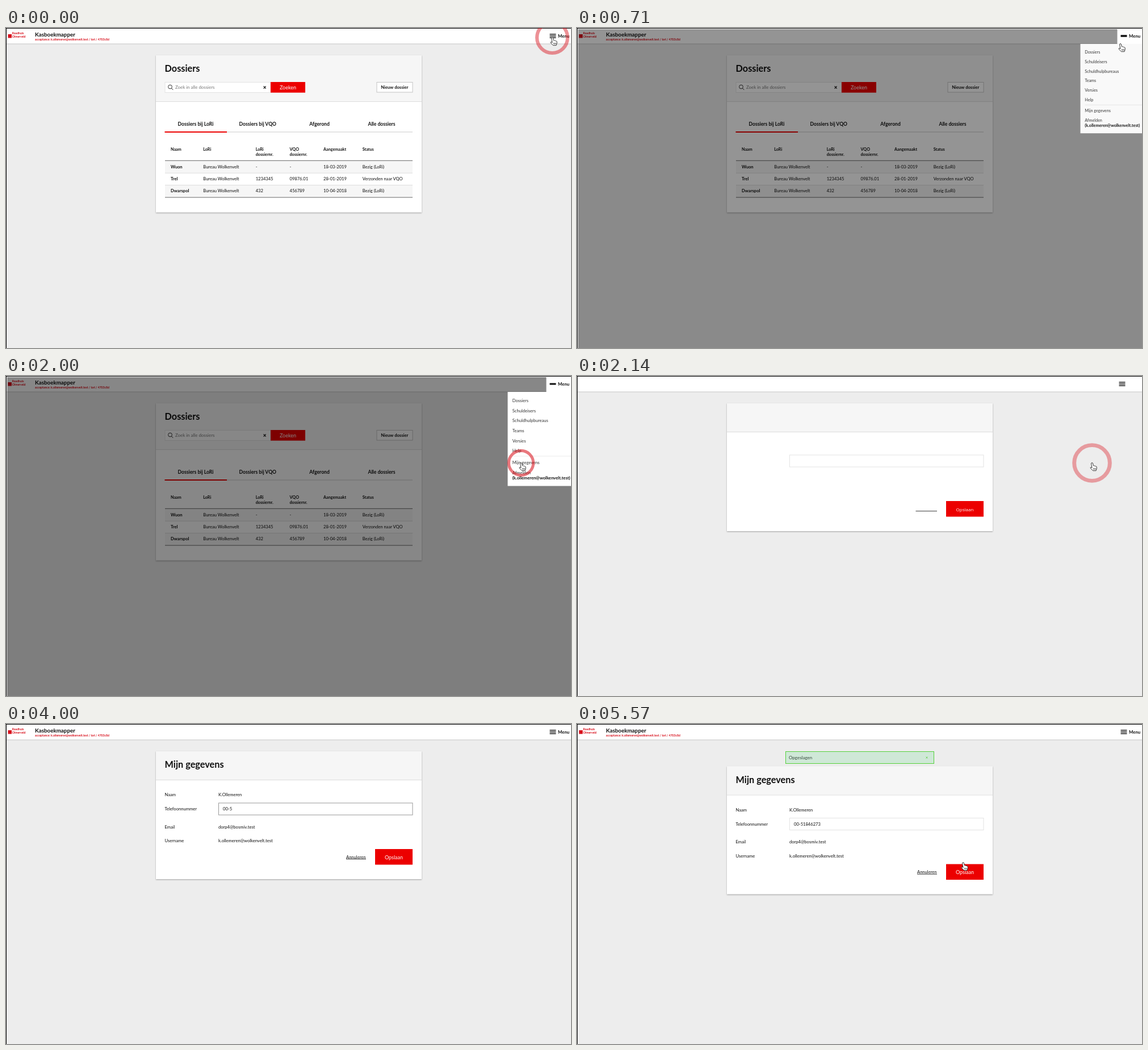
Recreate the animation shown at these times as an HTML page. Size 995 by 563 pixels, loop 6.14 s.

```html
<!DOCTYPE html>
<html lang="nl">
<head>
<meta charset="utf-8">
<title>Mijn gegevens</title>
<style>
  html, body { margin: 0; width: 100%; height: 100%; overflow: hidden; background: #ededed; }
  svg { display: block; width: 100vw; height: 100vh; }
  text { font: 7.6px Lato, "Open Sans", sans-serif; fill: #111; white-space: pre; }
  .b { font-weight: 700; }
  .m { text-anchor: middle; }
  .h1 { font-size: 16.3px; font-weight: 700; }
  .tab { font-size: 8.6px; font-weight: 700; text-anchor: middle; }
  .th { font-size: 7.2px; font-weight: 700; }
  .btn { font-size: 9px; fill: #fff; text-anchor: middle; }
  .brand { font-size: 5.1px; font-weight: 700; fill: #d8101c; }
  .red { fill: #ec0000; }
  .card { fill: #fff; filter: drop-shadow(0 1px 1px #0005); }
  .head { fill: #f6f6f6; }
  .box { fill: #fff; stroke: #e3e3e3; }
  .rule { stroke: #ddd; }
  .dark { stroke: #666; }
  .bare .txt { visibility: hidden; }
  .bare #save text { font: 8px "Open Sans", sans-serif; }
  .cursor { fill: #fff; stroke: #222; stroke-width: .9; stroke-linejoin: round; }
  #menu { transform-origin: 943.5px 28px; }
  #menu text { fill: #333; }
  #menu .b { fill: #111; }
</style>
</head>
<body>
<svg id="stage" viewBox="0 0 995 563" preserveAspectRatio="none">
  <rect width="995" height="563" fill="#ededed"/>
  <rect width="995" height="27.5" fill="#fff"/>
  <path d="M0 28H995" stroke="#c9c9c9"/>
  <g class="txt">
    <rect x="3.5" y="11" width="6.5" height="6.5" fill="#d8101c"/>
    <text class="brand" x="10.8" y="11.4">Raadhuis</text>
    <text class="brand" x="10.8" y="16.6">Olmerveld</text>
    <text class="b" x="51" y="15" style="font-size:9.8px">Kasboekmapper</text>
    <text class="brand" x="51" y="22.3">acceptance: k.ollemeren@wolkenvelt.test / lori / 4703c8d</text>
  </g>

  <g id="list">
    <rect class="card" x="264" y="48" width="468" height="276.5"/>
    <rect class="head" x="264" y="48" width="468" height="81.5"/>
    <path class="rule" d="M264 129.5H732"/>
    <text class="h1" x="279.5" y="77">Dossiers</text>
    <rect class="box" x="280" y="95.5" width="186" height="18"/>
    <g fill="none" stroke="#333"><circle cx="289" cy="103.5" r="3.4"/><path d="M291.5 106L294.3 109"/></g>
    <text x="298" y="106.6" style="font-size:7.9px;fill:#777">Zoek in alle dossiers</text>
    <path d="M453.6 102.4L457.6 106.6M457.6 102.4L453.6 106.6" stroke="#111" stroke-width="1.3"/>
    <rect class="red" x="466" y="95" width="61" height="18.7"/>
    <text class="btn" x="496.5" y="107.6">Zoeken</text>
    <rect class="box" x="653" y="95.5" width="63" height="17.5" style="stroke:#c4c4c4"/>
    <text class="b m" x="684.3" y="106.7">Nieuw dossier</text>
    <text class="tab" x="334" y="171.5">Dossiers bij LoRi</text>
    <text class="tab" x="443.3" y="171.5">Dossiers bij VQO</text>
    <text class="tab" x="552" y="171.5">Afgerond</text>
    <text class="tab" x="661.5" y="171.5">Alle dossiers</text>
    <path class="rule" d="M280 183H716" stroke-width="1.5"/>
    <rect class="red" x="279.5" y="182" width="109.5" height="2"/>
    <g id="table"></g>
  </g>

  <g id="form">
    <g id="saved">
      <rect x="367.5" y="48.5" width="261" height="21" fill="#cfe8d7" stroke="#55d13c"/>
      <text class="txt" x="373" y="61.6" style="font-size:8px;fill:#34493b">Opgeslagen</text>
      <path class="txt" d="M614.6 57.6L617.4 60.6M617.4 57.6L614.6 60.6" stroke="#6fd25a"/>
    </g>
    <g id="panel">
      <rect class="card" x="264" y="48" width="468" height="225"/>
      <rect class="head" x="264" y="48" width="468" height="50"/>
      <path class="rule" d="M264 98.5H732"/>
      <text class="h1 txt" x="279.5" y="77">Mijn gegevens</text>
      <rect class="box" id="field" x="374.5" y="139" width="341.5" height="21"/>
      <g class="txt">
        <text x="279.5" y="127.3">Naam</text><text x="374" y="127.3">K.Ollemeren</text>
        <text x="279.5" y="152">Telefoonnummer</text><text id="phone" x="382" y="152"></text>
        <text x="279.5" y="183.6">Email</text><text x="374" y="183.6">dorp4@bosmiv.test</text>
        <text x="279.5" y="208">Username</text><text x="374" y="208">k.ollemeren@wolkenvelt.test</text>
        <text x="599" y="236.5">Annuleren</text>
      </g>
      <path id="underline" stroke="#222" stroke-width=".9"/>
      <g id="save">
        <rect id="saveBox" x="650" y="220" width="66" height="27.5"/>
        <path id="focus" d="M649.3 220V247.5" stroke="#5b9de8" stroke-width="1.6"/>
        <text class="btn" x="683" y="237.8">Opslaan</text>
      </g>
    </g>
  </g>

  <rect id="shade" x="2" y="2" width="993" height="561"/>

  <g id="menu"><rect x="883.5" y="28" width="120.5" height="165.5" fill="#fff"/></g>
  <rect id="tile" x="951.5" y="1" width="43.5" height="27" fill="#fff"/>
  <path id="bars" stroke="#111" stroke-width="1.7"/>
  <text class="b txt" x="972" y="17.2" style="font-size:7.8px">Menu</text>
  <path d="M0 .5H995M.5 0V563" stroke="#000"/>

  <circle id="ring" fill="none" stroke="#d8101c"/>
  <g id="pointer">
    <g id="hand" class="cursor">
      <path d="M-1.5 1Q-1.2-.4 0-.4Q1.2-.4 1.5 1L2.4 4.9Q3.6 4.2 4.5 5.3Q5.8 4.8 6.4 6Q8 5.6 8.2 7.2V10L7 13.6H1.6L-2.7 9.2Q-3.4 7.4-1.7 7.5L0 8.7Z"/>
      <path d="M2.6 9V12M4.4 9V12M6.2 9V12" stroke-width=".7"/>
    </g>
    <path id="arrow" class="cursor" d="M0 0V11L2.6 8.6L4.4 12.4L6.2 11.6L4.5 8H8Z" style="fill:#111;stroke:#fff"/>
    <path id="beam" d="M-2.8-7Q0-7 0-5Q0-7 2.8-7M0-5V5.5M-2.8 7.5Q0 7.5 0 5.5Q0 7.5 2.8 7.5M-1.6 2H1.6" fill="none" stroke="#333" stroke-width="1.2"/>
  </g>
</svg>
<script>
const LOOP = 6140, FPS = 7;
const el = {};
document.querySelectorAll('[id]').forEach(n => el[n.id] = n);

function put(parent, tag, attrs, label = '') {
  const node = document.createElementNS('http://www.w3.org/2000/svg', tag);
  for (const name in attrs) node.setAttribute(name, attrs[name]);
  node.textContent = label;
  parent.append(node);
}

function buildTable() {
  const cols = [290, 347.3, 439.7, 499.5, 559, 627.7];
  const heads = ['Naam', 'LoRi', 'LoRi|dossiernr.', 'VQO|dossiernr.', 'Aangemaakt', 'Status'];
  const rows = [
    ['Wuon', 'Bureau Wolkenvelt', '-', '-', '18-03-2019', 'Bezig (LoRi)'],
    ['Trel', 'Bureau Wolkenvelt', '1234345', '09876.01', '28-01-2019', 'Verzonden naar VQO'],
    ['Dwarspol', 'Bureau Wolkenvelt', '432', '456789', '10-04-2018', 'Bezig (LoRi)']
  ];
  heads.forEach((head, c) => head.split('|').forEach((line, i) =>
    put(el.table, 'text', { class: 'th', x: cols[c], y: 216 + i * 8.7 }, line)));
  rows.forEach((row, r) => {
    const y = 234 + r * 21.2;
    if (r % 2 === 0) put(el.table, 'rect', { class: 'head', x: 280, y, width: 436, height: 21.2 });
    if (r) put(el.table, 'path', { class: 'rule', d: `M280 ${y}H716` });
    row.forEach((cell, c) =>
      put(el.table, 'text', { class: c ? '' : 'b', x: cols[c], y: y + 12.6 }, cell));
  });
  put(el.table, 'path', { class: 'dark', d: 'M280 233.3H716M280 298H716' });
}

function buildMenu() {
  const items = ['Dossiers', 'Schuldeisers', 'Schuldhulpbureaus', 'Teams', 'Versies', 'Help'];
  items.forEach((item, i) => put(el.menu, 'text', { x: 891.7, y: 45.8 + i * 17.7 }, item));
  put(el.menu, 'path', { class: 'rule', d: 'M892 141H1004', opacity: .6 });
  put(el.menu, 'text', { x: 891.7, y: 154.8 }, 'Mijn gegevens');
  put(el.menu, 'text', { x: 891.7, y: 172.6 }, 'Afmelden');
  put(el.menu, 'text', { class: 'b', x: 891.7, y: 182 }, '(k.ollemeren@wolkenvelt.test)');
}

// Linear interpolation through [tick, value, value...] keys
function mix(keys, k) {
  const i = keys.findIndex(key => key[0] > k);
  if (i === 0) return keys[0].slice(1);
  if (i < 0) return keys[keys.length - 1].slice(1);
  const a = keys[i - 1], b = keys[i], p = (k - a[0]) / (b[0] - a[0]);
  return a.slice(1).map((v, j) => v + (b[j + 1] - v) * p);
}

const PATH = [[0, 962, 17], [4, 962, 17], [5, 957, 28], [9, 912, 131], [11, 907, 153], [19, 907, 153],
  [20, 880, 155], [21, 780, 153], [22, 655, 145], [23, 586, 140.5], [24, 585, 148], [30, 586, 149],
  [31, 640, 205], [32, 680, 244]];
// First tick, end tick and starting radius of each click ring
const CLICKS = [[0, 1, 30], [12, 16, 3], [23, 27, 3], [33, 35, 9]];
const PHONE = '00-51846273';

const within = (k, a, b) => k >= a && k < b;
const show = (node, on) => node.style.display = on ? '' : 'none';
const set = (node, attrs) => { for (const n in attrs) node.setAttribute(n, attrs[n]); };

function drawPages(k) {
  const list = k < 15, saved = k >= 37, bare = k === 15 || k === 37;
  el.stage.classList.toggle('bare', bare);
  show(el.list, list);
  show(el.form, !list);
  show(el.saved, saved);
  set(el.panel, { transform: `translate(0 ${saved ? 26.5 : 0})` });
  el.field.style.stroke = within(k, 22, 32) ? '#999' : within(k, 32, 37) ? '#ccc' : '#e3e3e3';
  el.phone.textContent = PHONE.slice(0, Math.max(0, (k - 27) * 4));
  set(el.underline, { d: bare ? 'M596.5 237.7H634' : 'M599 237.7H634' });
  set(el.saveBox, { fill: within(k, 32, 37) ? '#000' : '#ec0000' });
  show(el.focus, within(k, 33, 37));
  return bare;
}

function drawMenu(k, bare) {
  const open = within(k, 3, 15);
  const [dim, scale, alpha, gap] = open
    ? mix([[3, .1, .45, .2, 3], [4, .29, .775, .7, 2.4], [5, .42, .95, .95, 1], [6, .47, 1, 1, .6]], k)
    : [0, 1, 0, 3];
  show(el.menu, open);
  show(el.tile, open);
  el.menu.style.transform = `scale(${scale})`;
  el.menu.style.opacity = alpha;
  set(el.shade, { opacity: dim });
  const x = bare ? 954.5 : 957.5;
  set(el.bars, { d: [-gap, 0, gap].map(y => `M${x} ${14 + y}h11`).join('') });
}

function drawPointer(k) {
  const [x, y] = mix(PATH, k);
  const beam = within(k, 22, 31), arrow = within(k, 18, 22) || k === 31;
  set(el.pointer, { transform: `translate(${x} ${y})` });
  show(el.pointer, !within(k, 28, 30));
  show(el.beam, beam);
  show(el.arrow, arrow);
  show(el.hand, !beam && !arrow);

  const click = CLICKS.find(([from, to]) => within(k, from, to));
  show(el.ring, click);
  if (!click) return;
  const outer = click[2] + (k - click[0]) * 10.6;
  const width = 1 + outer * .17;
  set(el.ring, { cx: x, cy: y, r: outer - width / 2, 'stroke-width': width, opacity: 1 - outer * .018 });
}

let last = -1;
function tick() {
  const k = Math.floor((performance.now() % LOOP + 5) * FPS / 1000);
  if (k !== last) {
    last = k;
    drawMenu(k, drawPages(k));
    drawPointer(k);
  }
  requestAnimationFrame(tick);
}

buildTable();
buildMenu();
tick();
</script>
</body>
</html>
```
